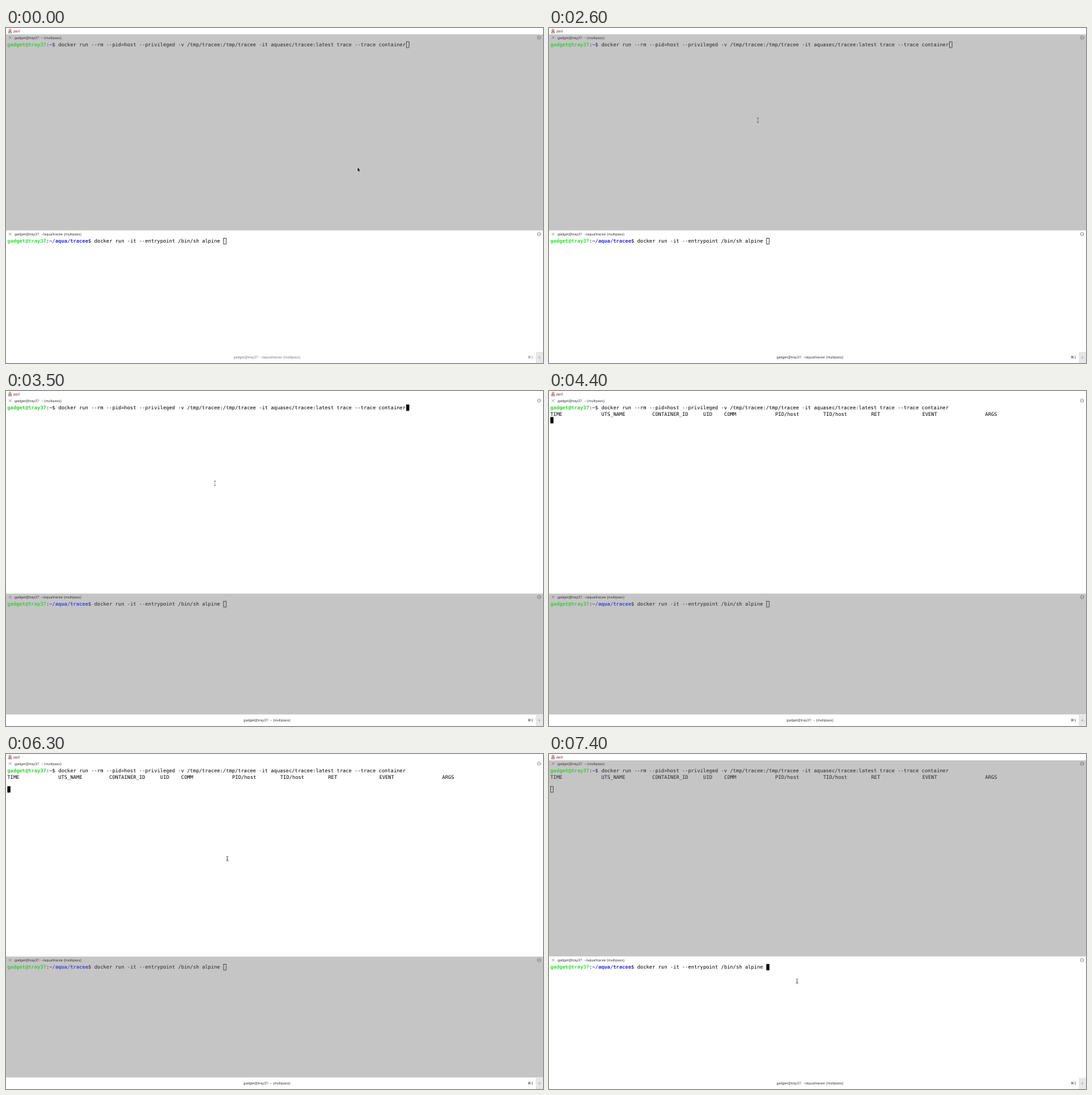
Write an HTML page that moves like this. It is 820 px wide and 512 px high and loops after 8 s.

```html
<!DOCTYPE html>
<html lang="en">
<head>
<meta charset="utf-8">
<title>Split terminal</title>
<style>
html, body { margin: 0; width: 100%; height: 100%; overflow: hidden; background: #fff; }
svg { display: block; width: 820px; height: 512px; }
text { text-rendering: geometricPrecision; white-space: pre; }

.ui { font: 5.46px "Liberation Sans", Arial, sans-serif; fill: #3c3c3c; }
.mono { font: 7.607px "DejaVu Sans Mono", Menlo, monospace; fill: var(--fg); }
.user { fill: var(--green); font-weight: bold; }
.path { fill: var(--blue); font-weight: bold; }
.bg { fill: var(--bg); }
.cursor { fill: var(--cursor); stroke: var(--fg); stroke-width: .7; }
.icon { fill: none; stroke: #666; stroke-width: .6; }

/* All changes are hard cuts within one 8 s loop. */
.anim { animation: 8s step-end infinite; }
#top { animation-name: top; }
#bottom { animation-name: bottom; }
#caret { animation-name: caret; }
#header { animation-name: header; }
#footer { animation-name: footer; }
#home { animation-name: home; }
#repo { animation-name: repo; }
#pointer { animation-name: pointer; }
#arrow { animation-name: arrow; }
#beam { animation-name: beam; }
#dots { animation-name: dots; }

@keyframes top {
  0%, 92.5% { --bg: #c5c5c5; --fg: #292929; --green: #45c745; --blue: #4848d8; --cursor: transparent; }
  33.75% { --bg: #fff; --fg: #000; --green: #35cf35; --blue: #3434f0; --cursor: #000; }
}
@keyframes bottom {
  0% { --bg: #fff; --fg: #000; --green: #2fe52f; --blue: #2c2cf5; --cursor: transparent; }
  33.75% { --bg: #c5c5c5; --fg: #292929; --green: #45c745; --blue: #4848d8; --cursor: transparent; }
  92.5% { --bg: #fff; --fg: #000; --green: #2fe52f; --blue: #2c2cf5; --cursor: #000; }
}
@keyframes caret {
  0% { transform: translate(611px, 20.6px); }
  52.5% { transform: translate(2px, 30.1px); }
  55% { transform: translate(2px, 39.7px); }
  67.5%, 100% { transform: translate(2px, 49.2px); }
}
@keyframes header {
  0% { opacity: 0; }
  55%, 100% { opacity: 1; }
}
@keyframes footer {
  0% { fill: #7c7c7c; }
  32.5%, 100% { fill: #3c3c3c; }
}
@keyframes home {
  0%, 92.5%, 100% { opacity: 0; }
  33.75% { opacity: 1; }
}
@keyframes repo {
  0%, 92.5%, 100% { opacity: 1; }
  33.75% { opacity: 0; }
}
@keyframes pointer {
  0% { transform: translate(537px, 213.5px); }
  3.75% { transform: translate(431.5px, 192.5px); }
  10% { transform: translate(130px, 138px); }
  21.25% { transform: translate(240.5px, 176px); }
  22.5% { transform: translate(225.7px, 167.7px); }
  25% { transform: translate(233px, 170px); }
  28.75% { transform: translate(255px, 160px); }
  30% { transform: translate(290px, 148px); }
  31.25% { transform: translate(317px, 140px); }
  32.5% { transform: translate(319px, 141px); }
  75% { transform: translate(328px, 150.5px); }
  78.75% { transform: translate(338px, 160px); }
  80% { transform: translate(395px, 195px); }
  81.25% { transform: translate(462px, 240px); }
  82.5% { transform: translate(507px, 290px); }
  83.75% { transform: translate(520px, 335px); }
  85% { transform: translate(500px, 360px); }
  86.25% { transform: translate(450px, 369px); }
  87.5% { transform: translate(400px, 355px); }
  88.75%, 100% { transform: translate(378.7px, 347.4px); }
}
@keyframes arrow {
  0%, 10% { opacity: 1; }
  5%, 32.5%, 100% { opacity: 0; }
}
@keyframes beam {
  0%, 43.75%, 83.75% { opacity: 0; }
  33.75%, 75%, 92.5%, 100% { opacity: 1; }
}
@keyframes dots {
  0%, 33.75%, 52.5%, 92.5%, 100% { opacity: 0; }
  32.5%, 43.75%, 83.75% { opacity: 1; }
}
</style>
</head>
<body>
<svg viewBox="0 0 820 512">
  <defs>
    <g id="bar" class="icon">
      <path d="M4.2 12.6l4.2 4.2m0-4.2l-4.2 4.2"/>
      <circle cx="814" cy="14.7" r="2.6"/>
      <path d="M812.3 14.7h.8m.5 0h.8m.5 0h.8" stroke-width=".8"/>
    </g>
    <rect id="cell" x=".35" y=".35" width="4" height="8.9"/>
  </defs>

  <g fill="none" stroke="#8a2626" stroke-width=".8">
    <circle cx="6.1" cy="3.4" r="1.5"/>
    <path d="M3.8 7.3V6.6q0-1.4 1.5-1.4h1.6q1.5 0 1.5 1.4v.7z"/>
  </g>
  <text class="ui" x="11" y="6.8" style="font-size:6.1px;fill:#7c2020">zerl</text>

  <g id="top" class="anim">
    <rect class="bg" y="9.6" width="820" height="300"/>
    <use href="#bar"/>
    <text class="ui" x="13" y="16.6">gadget@tray37: ~ (multipass)</text>
    <text class="mono" x="2" y="28"><tspan class="user">gadget@tray37</tspan>:<tspan class="path">~</tspan>$ <tspan x="79.9">docker run --rm --pid=host --privileged -v /tmp/tracee:/tmp/tracee -it aquasec/tracee:latest trace --trace container</tspan></text>
    <g id="header" class="anim">
      <text class="mono" y="37.6"><tspan x="2">TIME</tspan><tspan x="79.9">UTS_NAME</tspan><tspan x="157.7">CONTAINER_ID</tspan><tspan x="235.6">UID</tspan><tspan x="267.6">COMM</tspan><tspan x="345.5">PID/host</tspan><tspan x="418.8">TID/host</tspan><tspan x="492">RET</tspan><tspan x="569.9">EVENT</tspan><tspan x="666.1">ARGS</tspan></text>
    </g>
    <g id="caret" class="anim"><use class="cursor" href="#cell"/></g>
  </g>

  <g id="bottom" class="anim">
    <rect class="bg" y="309.6" width="820" height="185"/>
    <use href="#bar" y="300.3"/>
    <text class="ui" x="13" y="316.9">gadget@tray37: ~/aqua/tracee (multipass)</text>
    <text class="mono" x="2" y="328.3"><tspan class="user">gadget@tray37</tspan>:<tspan class="path">~/aqua/tracee</tspan>$ <tspan x="134.8">docker run -it --entrypoint /bin/sh alpine</tspan></text>
    <use class="cursor" href="#cell" x="331.8" y="320.9"/>
  </g>

  <rect y="494.6" width="820" height="18" fill="#fff"/>
  <rect x="809" y="495" width="11" height="17" fill="#e7e7e7"/>
  <path d="M811.8 503.4h5.4m-2.7-2.7v5.4" stroke="#aaa" stroke-width=".6"/>
  <g id="footer" class="ui anim" text-anchor="middle">
    <g style="fill:inherit">
      <text id="repo" class="anim" x="398.5" y="505.2">gadget@tray37: ~/aqua/tracee (multipass)</text>
      <text id="home" class="anim" x="398.5" y="505.2">gadget@tray37: ~ (multipass)</text>
      <text x="800.7" y="505.2" style="font-family:'Liberation Sans','DejaVu Sans',sans-serif">⌘1</text>
    </g>
  </g>

  <g id="pointer" class="anim">
    <path id="arrow" class="anim" d="M0 0v5.3l1.2-1.1.9 2.1.9-.4-.9-2h1.7z" fill="#000" stroke="#fff" stroke-width=".5" paint-order="stroke"/>
    <path id="beam" class="anim" d="M-1.6-3.4q1.6 0 1.6 1v4.8q0 1-1.6 1M1.6-3.4q-1.6 0-1.6 1m0 4.8q0 1 1.6 1M-.8 1.2h1.6" fill="none" stroke="#222" stroke-width=".7"/>
    <path id="dots" class="anim" d="M-1.2-3.1h2.4M-.6-.2h1.2M-1.2 2.9h2.4" fill="none" stroke="#222" stroke-width=".9"/>
  </g>
</svg>
</body>
</html>
```
